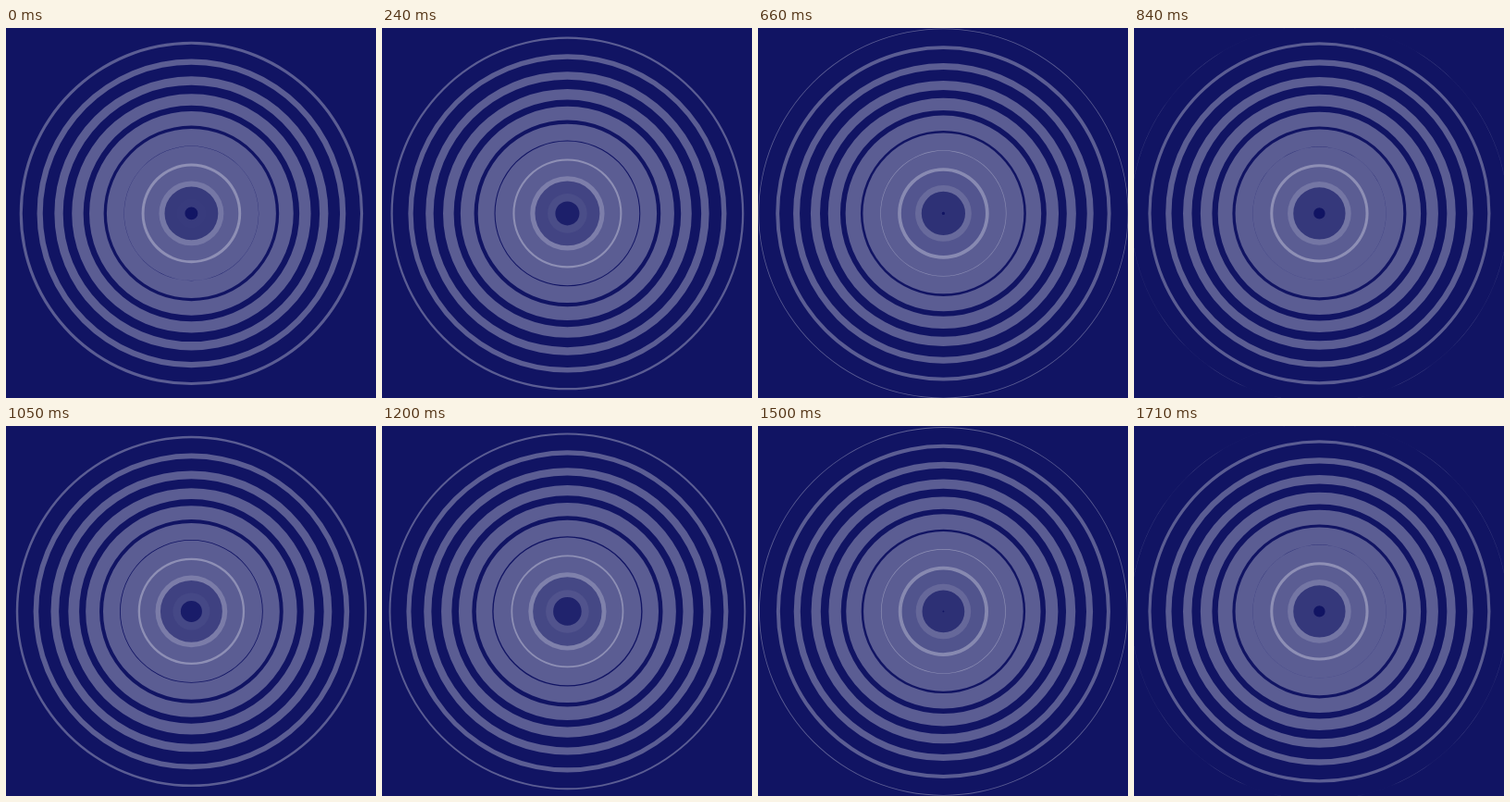
These frames come from a looping animation (400x400 px, 1.74 s). An HTML page with a canvas:

```html
<!DOCTYPE html>
<html>
<head>
<meta charset="utf-8">
<style>
  html, body { margin: 0; width: 100%; height: 100%; overflow: hidden; background: #111463; }
  canvas { display: block; width: 400px; height: 400px; }
</style>
</head>
<body>
<canvas id="stage" width="400" height="400"></canvas>
<script>
  const ctx = document.getElementById('stage').getContext('2d');
  const STEP = 30, PERIOD = 870, LEAD = 24;   // ms; one ring spacing per period
  const RINGS = 10, CENTER = 200.4, REACH = 204, WIDTH = 31.1, MIN_WIDTH = 0.1, ALPHA = 0.31;

  // p runs from 0 (centre) to 1 (past the edge)
  function ring(p) {
    const r = REACH * p, half = (WIDTH * (1 - p) + MIN_WIDTH) / 2;
    ctx.globalAlpha = ALPHA * Math.min(1, p / 0.2);
    ctx.beginPath();
    ctx.arc(CENTER, CENTER, r + half, 0, Math.PI * 2);
    if (r > half) ctx.arc(CENTER, CENTER, r - half, 0, Math.PI * 2, true);
    ctx.fill();
  }

  function draw(time) {
    const phase = (Math.floor(time / STEP) * STEP + LEAD) % PERIOD / PERIOD;
    ctx.globalAlpha = 1;
    ctx.fillStyle = '#111463';
    ctx.fillRect(0, 0, 400, 400);
    ctx.fillStyle = '#fff';
    for (let i = 0; i < RINGS; i++) ring((i + phase) / RINGS);
  }

  const start = performance.now();
  function loop() {
    draw(performance.now() - start);
    requestAnimationFrame(loop);
  }
  loop();
</script>
</body>
</html>
```
